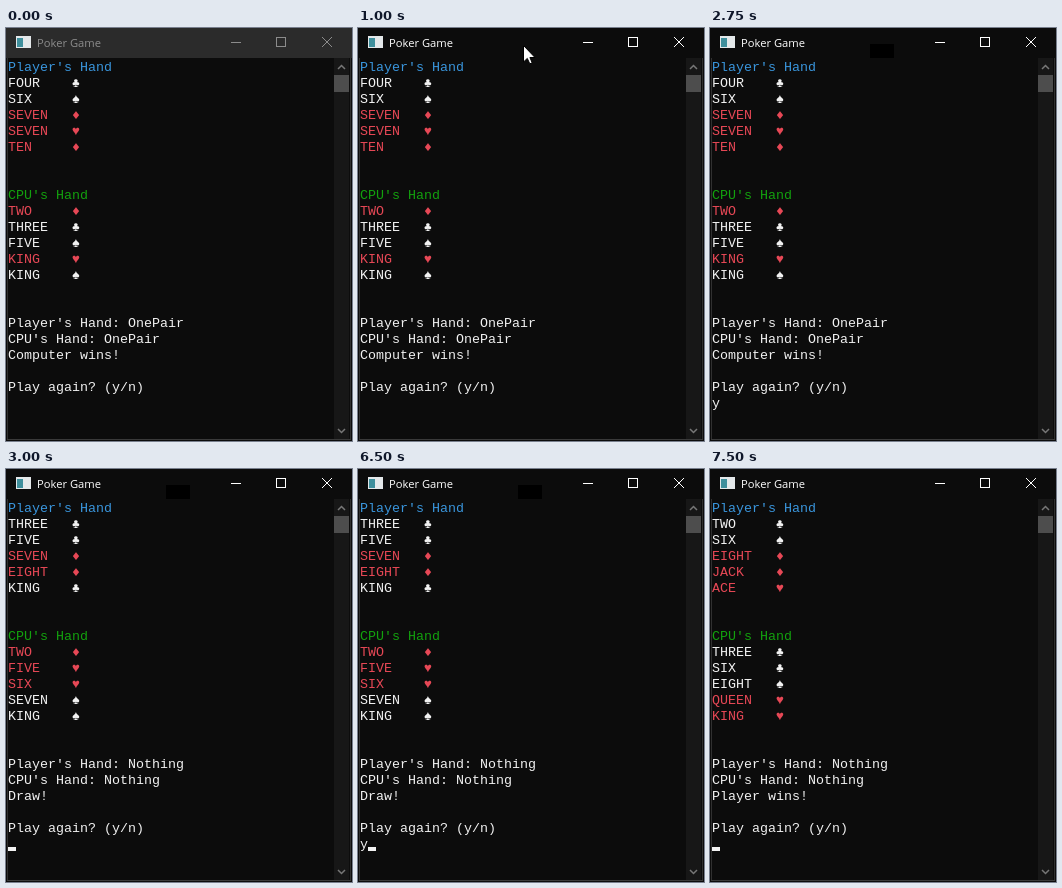
Write an HTML page with a canvas that moves like this. It is 346 by 413 pixels and loops after 8000 ms.

```html
<!DOCTYPE html>
<html lang="en">
<head>
<meta charset="utf-8">
<title>Poker Game</title>
<style>
  html, body { margin: 0; width: 100%; height: 100%; overflow: hidden; background: #0c0c0c; }
  canvas { display: block; }
</style>
</head>
<body>
<canvas id="stage" width="346" height="413"></canvas>
<script>
const ctx = document.getElementById('stage').getContext('2d');
const LOOP = 8000, CELL = 8, ROW = 16, LEFT = 2, TOP = 30;
const WHITE = '#f2f2f2', RED = '#e74856', BLUE = '#3a96dd', GREEN = '#13a10e';
const MONO = '13.333px "Liberation Mono", "DejaVu Sans Mono", monospace';

const rounds = [
  { from: 0, player: 'FOUR♣ SIX♠ SEVEN♦ SEVEN♥ TEN♦', cpu: 'TWO♦ THREE♣ FIVE♠ KING♥ KING♠',
    rank: 'OnePair', outcome: 'Computer wins!' },
  { from: 3000, player: 'THREE♣ FIVE♣ SEVEN♦ EIGHT♦ KING♣', cpu: 'TWO♦ FIVE♥ SIX♥ SEVEN♠ KING♠',
    rank: 'Nothing', outcome: 'Draw!' },
  { from: 7000, player: 'TWO♣ SIX♠ EIGHT♦ JACK♦ ACE♥', cpu: 'THREE♣ SIX♣ EIGHT♠ QUEEN♥ KING♥',
    rank: 'Nothing', outcome: 'Player wins!' }
];
const answerTimes = [[2500, 3000], [6500, 7000]];
const caretTimes = [[1500, 2000], [2500, 2750], [3000, 3750], [4250, 4750], [5250, 5750], [6250, LOOP]];
const pointerStops = [[250, 133, 125], [500, 153, 41], [750, 165, 17]];

const during = (t, spans) => spans.some(([a, b]) => t >= a && t < b);

function rect(x, y, w, h, color) {
  ctx.fillStyle = color;
  ctx.fillRect(x, y, w, h);
}

function line(points, color, width = 1) {
  ctx.beginPath();
  points.forEach(([x, y]) => ctx.lineTo(x, y));
  ctx.strokeStyle = color;
  ctx.lineWidth = width;
  ctx.stroke();
}

function print(text, row, color = WHITE, col = 0) {
  ctx.font = MONO;
  ctx.fillStyle = color;
  ctx.fillText(text, LEFT + col * CELL, TOP + row * ROW + 13);
}

function printHand(title, color, cards, row) {
  print(title, row, color);
  cards.split(' ').forEach((card, i) => {
    const suit = card.slice(-1), ink = '♥♦'.includes(suit) ? RED : WHITE;
    print(card.slice(0, -1), row + 1 + i, ink);
    print(suit, row + 1 + i, ink, 8);
  });
}

function drawTitleBar(active, patch) {
  const ink = active ? '#ffffff' : '#8c8c8c';
  rect(0, 0, 346, TOP, active ? '#0c0c0c' : '#2b2b2b');
  if (patch) rect(160, 16, 24, 14, '#000');
  rect(10, 8, 15, 12, '#e4e8ea');
  rect(11, 10, 6, 9, '#3f8f9c');
  ctx.font = '11.2px "Open Sans", "Noto Sans", sans-serif';
  ctx.fillStyle = ink;
  ctx.fillText('Poker Game', 31, 19);
  rect(225, 14, 10, 1, ink);
  ctx.strokeStyle = ink;
  ctx.lineWidth = 1;
  ctx.strokeRect(270.5, 9.5, 9, 9);
  line([[316, 9], [326, 19]], ink);
  line([[326, 9], [316, 19]], ink);
}

function drawFrame() {
  rect(328, TOP, 15, 381, '#171717');
  rect(328, 47, 15, 17, '#4d4d4d');
  line([[332, 41], [335.5, 37.5], [339, 41]], '#777', 1.5);
  line([[332, 401], [335.5, 404.5], [339, 401]], '#777', 1.5);
  rect(1, TOP, 1, 382, '#303030');
  rect(344, TOP, 1, 382, '#303030');
  rect(1, 411, 344, 1, '#3a3a3a');
}

function drawPointer(x, y) {
  ctx.save();
  ctx.translate(x + .5, y + .5);
  const outline = [[0, 0], [0, 16.5], [3.8, 12.9], [6.3, 18.3], [8.7, 17.3], [6.4, 12], [11.5, 12], [0, 0]];
  ctx.beginPath();
  outline.forEach(([px, py]) => ctx.lineTo(px, py));
  ctx.fillStyle = '#fff';
  ctx.fill();
  line(outline, '#000');
  ctx.restore();
}

function draw(t) {
  const round = rounds.filter(r => t >= r.from).pop();
  const answered = during(t, answerTimes);
  rect(0, 0, 346, 413, '#0c0c0c');
  drawTitleBar(t >= 1000, t >= 1250 && t < 7500);
  drawFrame();
  printHand("Player's Hand", BLUE, round.player, 0);
  printHand("CPU's Hand", GREEN, round.cpu, 8);
  print("Player's Hand: " + round.rank, 16);
  print("CPU's Hand: " + round.rank, 17);
  print(round.outcome, 18);
  print('Play again? (y/n)', 20);
  if (answered) print('y', 21);
  if (during(t, caretTimes)) rect(LEFT + (answered ? CELL : 0), 378, CELL, 4, WHITE);
  const stop = pointerStops.filter(([from]) => t >= from).pop();
  if (stop && t < 1250) drawPointer(stop[1], stop[2]);
}

function tick() {
  draw(performance.now() % LOOP);
  requestAnimationFrame(tick);
}
tick();
</script>
</body>
</html>
```
